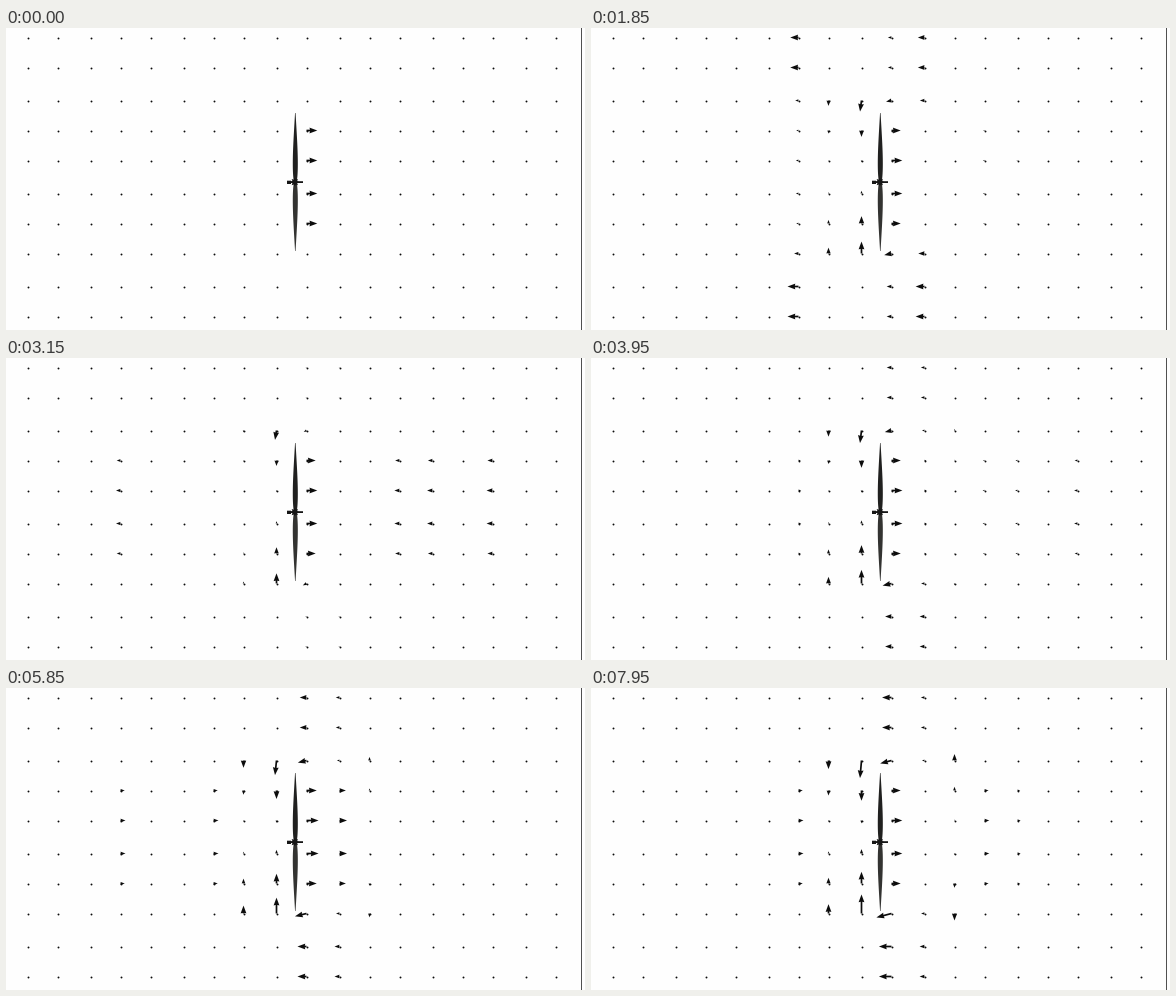
A matplotlib script that plays this animation: 579x302 px, repeating every 8000 ms.

```python
import numpy as np
import matplotlib.pyplot as plt
from matplotlib.animation import FuncAnimation

W, H, DPI = 579, 302, 64
STEP, FRAMES = 50, 160
PX = 72 / DPI
INK = "#0c0c0c"


def snapped(start, stop, n):
    """Evenly spaced places, snapped to a 3 px raster."""
    return 3 * np.round(np.linspace(start, stop, n) / 3) + 0.5


X, Y = np.meshgrid(snapped(21, 549, 18), snapped(9, 288, 10))

# vertical profiles over the ten rows
R = np.arange(10)
JET = (R >= 3) & (R <= 6)
TIP = 0.75 * (R == 2) + (R == 7)
OUT = 0.75 * (R < 2) + (R > 7)
SUCK = np.where((R >= 2) & (R <= 7), (4.4 - R) / 2.5, 0)
MID = np.where((R == 3) | (R == 6), 0.85, 1) * JET


def bump(t, peak, width):
    return np.exp(-((t - peak) / width) ** 2)


def west(t):
    """Wave that runs away to the left of the propeller."""
    return np.interp(t, [1.4, 2.15, 3, 4.75, 5.85, 7, 7.95],
                     [0, -4.5, 0, 5, 5, 0, 5])


def east(t):
    """Wave that runs away to the right of the propeller."""
    return np.interp(t, [1.5, 2.8, 3.2, 4.4, 4.8, 5.4, 6.3, 6.9, 7.6, 8],
                     [0, -6, -5, 0, 4, 0, 0, -5, 0, 5.5])


def field(t):
    """Velocities (right, down) in pixels after t seconds."""
    u, v = np.zeros((2,) + X.shape)
    start = 1 - np.exp(-t / 0.5)
    grow = (t / 8) ** 2
    surge = start * (0.5 + 0.5 * np.cos(np.pi * (t - 1.85)))
    suction = start * (8 + 3.5 * surge + 7 * grow)
    back = surge * (4.5 + 8.5 * grow)
    first = bump(t, 1.85, 0.45)

    # jet behind the disc
    u[:, 9] = MID ** start * JET * (10.8 + 2 * bump(t, 5.3, 0.8))
    u[:, 10] = MID * 8 * bump(t, 5.5, 1.4)
    # flow drawn in and round the blade tips
    v[:, 8] = SUCK * suction
    v[:, 7] = SUCK * suction * (0.12 + 0.38 * surge)
    v[:, 11] = -SUCK * 7 * grow * surge
    u[2, 8] = -1.5 * start
    u[:, 9] -= OUT * back + TIP * (2.5 * start + back)
    v[:, 9] = TIP * start * (1.5 + 2.5 * grow)
    u[:, 10] -= (OUT + 0.7 * TIP) * (5 * surge + 4 * first)
    u[:, 6] = -(OUT + 0.4 * TIP) * 11 * first
    # far field
    for col in (3, 6):
        u[:, col] += MID * west(t - (6 - col) / 3)
    for col in (12, 13, 15):
        u[:, col] += MID * east(t - 0.12 * (col - 12))
    return u, v


fig = plt.figure(figsize=(W / DPI, H / DPI), dpi=DPI, facecolor="#fefefe")
ax = fig.add_axes([0, 0, 1, 1])
ax.set(xlim=(0, W), ylim=(H, 0))
ax.axis("off")


def shape(x, y, color):
    ax.fill(x, y, color=color, lw=0, snap=False, zorder=4)


def blade(root, tip, color):
    s = np.linspace(0, 1, 40)
    half = 0.8 * (1 - s) + 0.25 + 1.7 * np.sin(np.pi * s ** 0.6)
    x, y = 289.3, root + (tip - root) * s
    shape(np.r_[x - half, (x + half)[::-1]], np.r_[y, y[::-1]], color)


blade(154, 85, "#20201f")
blade(154, 223, "#333331")
# shaft and a star-shaped hub
shape([281, 285, 285, 297, 297, 285, 285, 281],
      [152.7, 152.7, 153.2, 153.2, 155, 155, 156, 156], "#161616")
turn = np.arange(16) * np.pi / 8
spike = np.where(np.arange(16) % 2, 2.6, 4.4)
shape(288.8 + spike * np.cos(turn), 154.1 + spike * np.sin(turn), "#161616")

shape([575, 576, 576, 575], [0, 0, H, H], "#505050")
ax.scatter(X, Y, s=(1.9 * PX) ** 2, c=INK, linewidths=0, snap=False)
arrows = ax.quiver(X, Y, *field(0), angles="xy", scale_units="xy", scale=1,
                   units="dots", width=1.7, headwidth=3.4, headlength=4.6,
                   headaxislength=4.3, minlength=0.01, color=INK, snap=False,
                   zorder=3)


def draw(i):
    arrows.set_UVC(*field(i * STEP / 1000))
    return arrows,


anim = FuncAnimation(fig, draw, frames=FRAMES, interval=STEP,
                     repeat=True, repeat_delay=0, blit=False)
plt.show()
```
